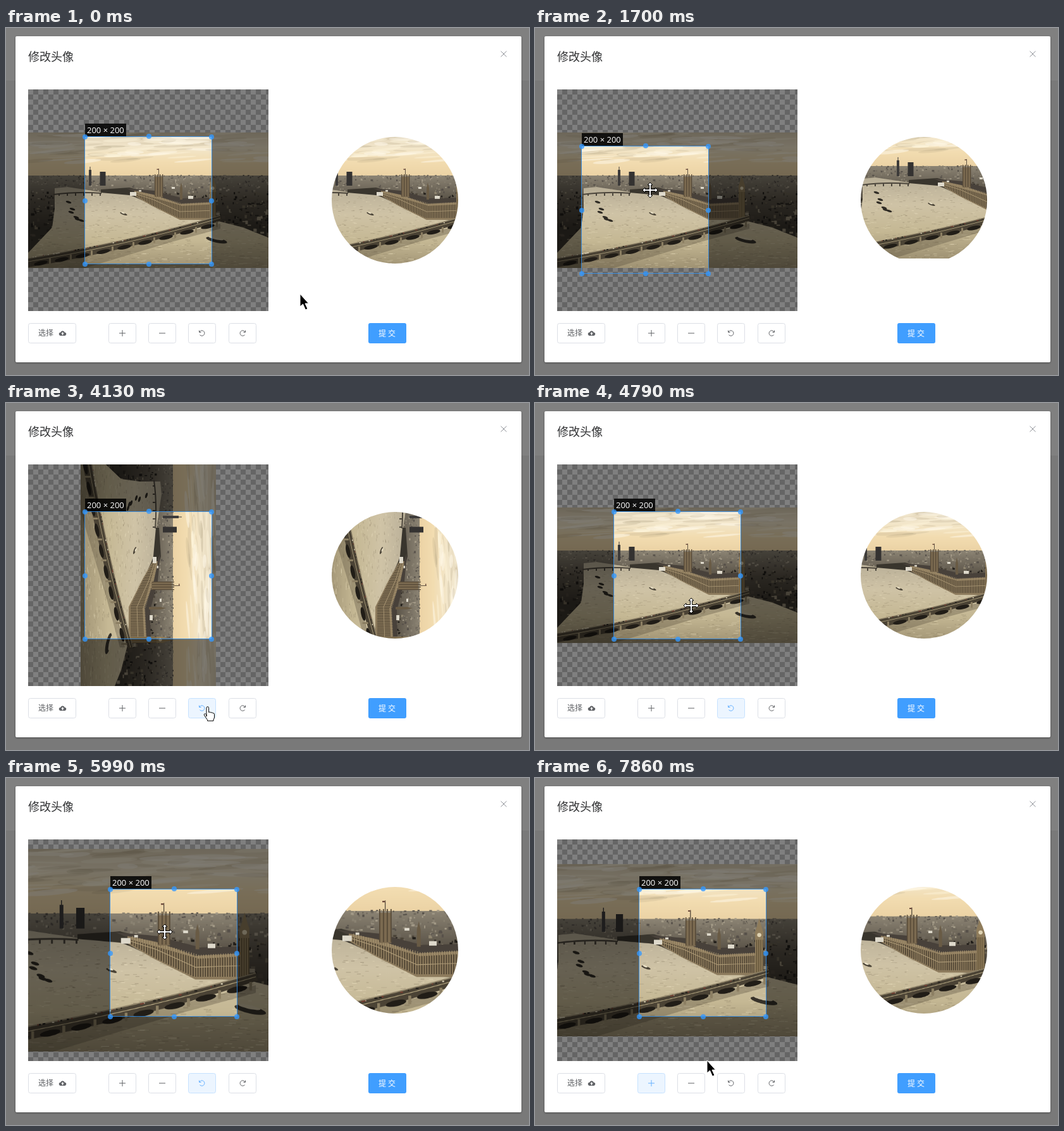
Recreate the animation shown at these times as an HTML page with a canvas. Size 827 by 548 pixels, loop 8 s.

```html
<!DOCTYPE html>
<html lang="zh">
<head>
<meta charset="utf-8">
<title>修改头像</title>
<style>
  html, body { margin: 0; width: 100%; height: 100%; overflow: hidden; background: linear-gradient(#808080 83px, #797979 83px); }
  .dialog { position: absolute; left: 15px; top: 13px; width: 800px; height: 515px; background: #fff; border-radius: 2px; box-shadow: 0 1px 3px rgba(0, 0, 0, .4); }
  canvas, svg { position: absolute; left: 0; top: 0; }
  text { font: 12px "Noto Sans CJK SC", "Noto Sans CJK", sans-serif; fill: #606266; }
  .title { font-size: 18px; fill: #303133; }
  .size { font: 13px "Open Sans", sans-serif; fill: #fff; }
  .button rect { fill: #fff; stroke: #dcdfe6; }
  .button path { fill: none; stroke: #606266; }
  .button.on rect { fill: #ecf5ff; stroke: #c6e2ff; }
  .button.on path { stroke: #66b1ff; }
  #handles circle { fill: #39f; fill-opacity: .78; }
</style>
</head>
<body>
<div class="dialog"></div>
<canvas id="view" width="827" height="548"></canvas>
<svg width="827" height="548">
  <text class="title" x="35" y="52">修改头像</text>
  <path d="M782.5 36.5l9 9m0-9l-9 9" stroke="#909399" fill="none"/>
  <g class="button"><rect x="35.5" y="466.5" width="75" height="31" rx="3"/></g>
  <text x="51" y="486">选择</text>
  <g transform="translate(89.5 482)">
    <path d="M-3 4a2.6 2.6 0 0 1-.3-5.2a3.4 3.4 0 0 1 6.6 0a2.6 2.6 0 0 1-.3 5.2z" fill="#606266"/>
    <path d="M0-1.8L2.3.8H.8V3H-.8V.8H-2.3z" fill="#fff"/>
  </g>
  <g id="tools"></g>
  <rect x="573" y="466" width="60" height="32" rx="3" fill="#409eff"/>
  <text x="589" y="486.500" style="fill:#fff;font-weight:500;letter-spacing:3px">提交</text>
  <g id="crop">
    <rect x="-.5" y="-.5" width="201" height="201" fill="none" stroke="#39f" stroke-opacity=".8"/>
    <rect y="-21" width="65" height="20" fill="#000" fill-opacity=".85"/>
    <text class="size" x="3" y="-6">200 × 200</text>
    <g id="handles"></g>
  </g>
  <path id="cursor"/>
</svg>
<script>
const LOOP = 8000, W = 380, H = 214;
const $ = id => document.getElementById(id);
const clamp = (v, lo, hi) => Math.max(lo, Math.min(hi, v));

// ---- river scene, painted once at double size ----
let seed = 7;
const rnd = (lo = 0, hi = 1) => {
  seed = (seed * 1664525 + 1013904223) % 4294967296;
  return lo + (hi - lo) * seed / 4294967296;
};
const pick = list => list[Math.floor(rnd(0, list.length))];

function paintScene() {
  const canvas = document.createElement('canvas');
  canvas.width = W * 2;
  canvas.height = H * 2;
  const g = canvas.getContext('2d');
  g.scale(2, 2);
  const shape = (color, d) => { g.fillStyle = color; g.fill(new Path2D(d)); };
  const line = (color, width, d) => { g.strokeStyle = color; g.lineWidth = width; g.stroke(new Path2D(d)); };
  const box = (color, x, y, w, h) => { g.fillStyle = color; g.fillRect(x, y, w, h); };
  const blob = (color, x, y, rx, ry, turn = 0) => {
    g.fillStyle = color;
    g.beginPath();
    g.ellipse(x, y, rx, ry, turn, 0, 7);
    g.fill();
  };
  const fade = (y0, y1, ...colors) => {
    const f = g.createLinearGradient(0, y0, 0, y1);
    colors.forEach((c, i) => f.addColorStop(i / (colors.length - 1), c));
    return f;
  };

  box(fade(0, 70, '#dccfb4', '#f3e7cc', '#f2dcb0', '#ebd2a4'), 0, 0, W, 72);
  for (let i = 0; i < 90; i++) {
    const y = rnd(0, 46);
    blob(pick(['#fffaec80', '#fff6e060', '#a2937830', '#b7a88a38']), rnd(0, W), y, rnd(10, 38), rnd(.8, 3.2), rnd(-.12, .05));
  }

  box(fade(68, 150, '#8c8474', '#564f44', '#37322a'), 0, 68, W, 130);
  for (let i = 0; i < 1100; i++) {
    const depth = Math.pow(rnd(), 1.4);
    const far = ['#a39a87', '#6f685c', '#57514a', '#8a8272'];
    const near = ['#2a2620', '#4a4338', '#6b6250', '#1f1c18', '#8f8570'];
    box(pick(depth < .25 ? far : near), rnd(-4, W), 67 + depth * 105, rnd(1, 3 + depth * 5), rnd(1, 2.5 + depth * 5));
  }
  box('#3d3b3a', 96, 59, 4, 25);
  box('#3d3b3a', 97.5, 54, 1, 6);
  box('#343231', 113.500, 62, 9, 22);

  const river = new Path2D('M42 88L62 86 115 94 160 98 195 114 240 137 297 139 340 150 380 166V214H0V190L38 150 42 120z');
  g.save();
  g.clip(river);
  box(fade(86, 214, '#b8ae97', '#cfc3a6', '#c5b894', '#9f9273'), 0, 84, W, 130);
  for (let i = 0; i < 1000; i++) {
    const y = rnd(100, H);
    box(pick(['#efe4c470', '#e2d6b470', '#6f644c50', '#857a6050']), rnd(-5, W), y, rnd(2, 3 + (y - 90) / 18), rnd(.4, 1.1));
  }
  shape('#4b423050', 'M0 214V208L240 160 304 144V152L230 172 90 214z');
  g.restore();

  line('#4c463c', 2, 'M40 98Q78 93 116 96');
  for (let x = 48; x < 114; x += 13) box('#4c463c', x, 96, 2, 4);
  shape('#39352d', 'M115 90L160 87 203 98 200 112 160 99 115 95z');

  // riverside hall with its towers
  shape('#48413a', 'M155 88L200 92 245 104 290 103 297 114 240 117 190 103z');
  shape('#8d7b5d', 'M168 92L198 98 240 113 297 110V138L240 138 196 116 168 100z');
  for (let x = 172; x < 296; x += 2.6) {
    const top = x < 240 ? 94 + (x - 172) * .28 : 114 - (x - 240) * .05;
    const foot = x < 196 ? 101 + (x - 172) * .58 : Math.min(135, 115 + (x - 196) * .48);
    box('#463c2d', x, top + 2, 1, foot - top - 2);
    box('#a99672', x + .8, top - 2, .8, 4);
  }
  line('#b09d79', .8, 'M170 97L198 106 240 125 297 123');
  box('#7b6a50', 200, 70, 13, 32);
  for (let x = 200; x < 214; x += 4) box('#574a38', x, 66, 1.3, 35);
  box('#3e362c', 206, 57, .8, 11);
  box('#6b4a3c', 203.500, 57.500, 3, 1.5);
  shape('#695b45', 'M240 88l2-9 2 9v18h-4z');
  shape('#8f7c5b', 'M287 84L289 78 292 67 295 78 297 84V137H287z');
  for (let x = 288.500; x < 297; x += 2.5) box('#57492f', x, 94, .8, 42);
  blob('#ded2b2', 292, 88, 2.6, 2.6);
  for (const [x, y, w] of [[161, 94, 10], [253, 100, 8], [175, 91, 4], [227, 86, 5]]) box('#ded9cb', x, y, w, w * .6);

  // long bridge in the foreground
  shape('#4b4335', 'M0 199Q165 171 304 131L306 139Q170 184 0 213z');
  line('#8e8268', 1.2, 'M0 199Q165 171 304 131');
  line('#b5a782', .7, 'M0 204Q165 176 304 135');
  for (let i = 0; i < 9; i++) {
    const x = 20 + i * 33, y = 203.500 - x * .155 - x * x * .00021;
    blob('#211d17', x, y + 6, 11, 3.2, -.21);
    box('#8c7f63', x + 13, y - 2, 3, 9);
  }
  for (let i = 0; i < 40; i++) {
    const x = rnd(0, 300);
    box(pick(['#1f1c18', '#d8ceb4', '#743b2e']), x, 197 - x * .145 - x * x * .00023, rnd(1, 3), 1.4);
  }

  for (const [x, y] of [[64, 110], [70, 121], [68, 126], [76, 134], [84, 139], [78, 137]]) blob('#302c25', x, y, 4.5, 1.7, .3);
  blob('#4a4336', 151, 128.500, 6, 1.6, .35);
  blob('#eee5cb', 150, 127, 3, .9, .35);
  blob('#37322a', 298, 170, 17, 4, .22);
  blob('#c9bea0', 297, 167, 12, 2, .22);
  return canvas;
}
const photo = paintScene();

// ---- interface parts ----
const turnIcon = 'M-4.5-4.5V-1.500H-1.500M-4-2A4.200 4.200 0 1 1-3.500 2.700';
const tools = [[162, 'M-5 0H5M0-5V5'], [225, 'M-5 0H5'], [288, turnIcon], [352, turnIcon]];
$('tools').innerHTML = tools.map(([x, d], i) =>
  `<g class="button"><rect x="${x + .5}" y="466.5" width="43" height="31" rx="3"/>
   <path d="${d}" transform="translate(${x + 22} 482) scale(${i == 3 ? -1 : 1} 1)"/></g>`).join('');
$('handles').innerHTML = [[0, 0], [101, -1], [200, 0], [0, 101], [200, 101], [0, 201], [101, 201], [200, 201]]
  .map(([x, y]) => `<circle cx="${x}" cy="${y}" r="4"/>`).join('');

const cursors = {
  arrow: ['M0 0V20l4.500-4 4 9 3.500-1.500-4-8.500h5.500z', '#000', '#fff'],
  hand: ['M-2 15V1.500a1.800 1.800 0 0 1 3.600 0V8.500q2-1.200 3.400 .5q2-.8 3.200 .8q2.300-.4 2.300 2V16q0 2-1.500 4v2H-.5V20.500L-5.500 13q-.8-2 1-2.400q1.200 0 2.500 2z', '#fff', '#000'],
  move: ['M0-12L4-8H1.500V-1.500H8V-4L12 0 8 4V1.500H1.500V8H4L0 12-4 8H-1.500V1.500H-8V4L-12 0-8-4V-1.500H-1.500V-8H-4z', '#fff', '#000']
};

// ---- timeline ----
// first picture, last picture, number of pictures
const runs = [[430, 1400, 8], [1550, 2490, 8], [2610, 3570, 8], [3720, 4130, 4],
  [4400, 5340, 8], [5480, 6420, 8], [6540, 7500, 8], [7620, 7860, 3]];
const path = [[300, 465, 420], [850, 233, 241], [1125, 300, 300], [1260, 290, 310], [1400, 250, 290],
  [1550, 205, 262], [1684, 182, 256], [1820, 165, 262], [2090, 140, 320], [2220, 150, 488], [2490, 225, 330],
  [2750, 247, 248], [2880, 247, 248], [3160, 319, 480], [4410, 319, 480], [4800, 211, 239], [5340, 251, 243],
  [6420, 251, 243], [6540, 258, 400], [6677, 269, 477], [6810, 250, 484], [7200, 250, 484],
  [7360, 187, 484], [7680, 187, 484], [7860, 272, 446]];
const wheel = [[5400, 1], [5890, 1.5], [6030, 1.5], [6300, 1.27]];
const clicks = { minus: [6810, 6940, 7080], plus: [7360, 7495, 7615], turn: [3565, 3850, 4125, 4400] };

const since = (times, t) => times.filter(at => at <= t).length;

function tween(keys, t) {
  const i = keys.findIndex(k => k[0] > t);
  if (i < 1) return keys[i ? keys.length - 1 : 0].slice(1);
  const a = keys[i - 1], b = keys[i], p = (t - a[0]) / (b[0] - a[0]);
  return a.slice(1).map((v, n) => v + (b[n + 1] - v) * p);
}

function snap(t) {
  const run = runs.filter(r => r[0] <= t).pop();
  if (!run) return 0;
  const [start, end, n] = run, step = (end - start) / (n - 1);
  return start + step * Math.min(n - 1, Math.floor((t - start) / step + 1e-6));
}

function cropAt(t) {
  const drag = (until, dx, dy) => {
    const [x, y] = tween(path, Math.min(t, until));
    return [clamp(Math.round(x - dx), 35, 215), clamp(Math.round(y - dy), 97, 247)];
  };
  if (t >= 4800) return drag(5340, 86, 67);
  if (t >= 850 && t < clicks.turn[0]) return drag(2750, 108, 69);
  return [125, 172];
}

const toolAt = (x, y, inset) => y < 466 || y > 498 ? -1 :
  tools.findIndex(([left]) => x >= left + inset && x <= left + 44 - inset);

// ---- drawing ----
const ctx = $('view').getContext('2d');

function drawPhoto(turns, zoom) {
  ctx.translate(225, 272);
  ctx.rotate(-turns * Math.PI / 2);
  ctx.scale(zoom, zoom);
  ctx.drawImage(photo, -W / 2, -H / 2, W, H);
}

function clipped(outline, paint) {
  ctx.save();
  ctx.beginPath();
  outline();
  ctx.clip();
  paint();
  ctx.restore();
}

function render(t) {
  const [cx, cy] = tween(path, t).map(Math.round);
  const [x, y] = cropAt(t);
  const turns = since(clicks.turn, t) % 4;
  const zoom = tween(wheel, t)[0] + .053 * (since(clicks.plus, t) - since(clicks.minus, t));

  ctx.clearRect(0, 0, 827, 548);
  clipped(() => ctx.rect(35, 97, 380, 350), () => {
    for (let r = 0; r < 44; r++) for (let c = 0; c < 48; c++) {
      ctx.fillStyle = (r + c) % 2 ? '#ccc' : '#fff';
      ctx.fillRect(35 + c * 8, 97 + r * 8, 8, 8);
    }
    ctx.save();
    drawPhoto(turns, zoom);
    ctx.restore();
    ctx.fillStyle = 'rgba(0,0,0,.5)';
    ctx.fillRect(35, 97, 380, 350);
  });
  clipped(() => ctx.rect(x, y, 200, 200), () => drawPhoto(turns, zoom));
  clipped(() => ctx.arc(615, 272, 100, 0, 7), () => {
    ctx.translate(515 - x, 172 - y);
    drawPhoto(turns, zoom);
  });

  $('crop').setAttribute('transform', `translate(${x} ${y})`);
  const focus = t >= clicks.plus[0] ? 0 : t >= clicks.minus[0] ? 1 : t >= clicks.turn[0] ? 2 : -1;
  const hover = toolAt(cx, cy, 4);
  [...$('tools').children].forEach((b, i) => b.classList.toggle('on', i == focus || i == hover));

  const dragging = t >= 850 && t <= 2880;
  const inCrop = cx >= x && cx <= x + 200 && cy >= y && cy <= y + 200;
  const kind = dragging || inCrop ? 'move' : toolAt(cx, cy, 0) >= 0 ? 'hand' : 'arrow';
  const [d, fill, stroke] = cursors[kind], cursor = $('cursor');
  Object.entries({ d, fill, stroke, transform: `translate(${cx} ${cy})` })
    .forEach(([name, value]) => cursor.setAttribute(name, value));
}

let shown = -1;
function tick(now) {
  const t = snap(now % LOOP);
  if (t !== shown) render(shown = t);
  requestAnimationFrame(tick);
}
tick(performance.now());
</script>
</body>
</html>
```
